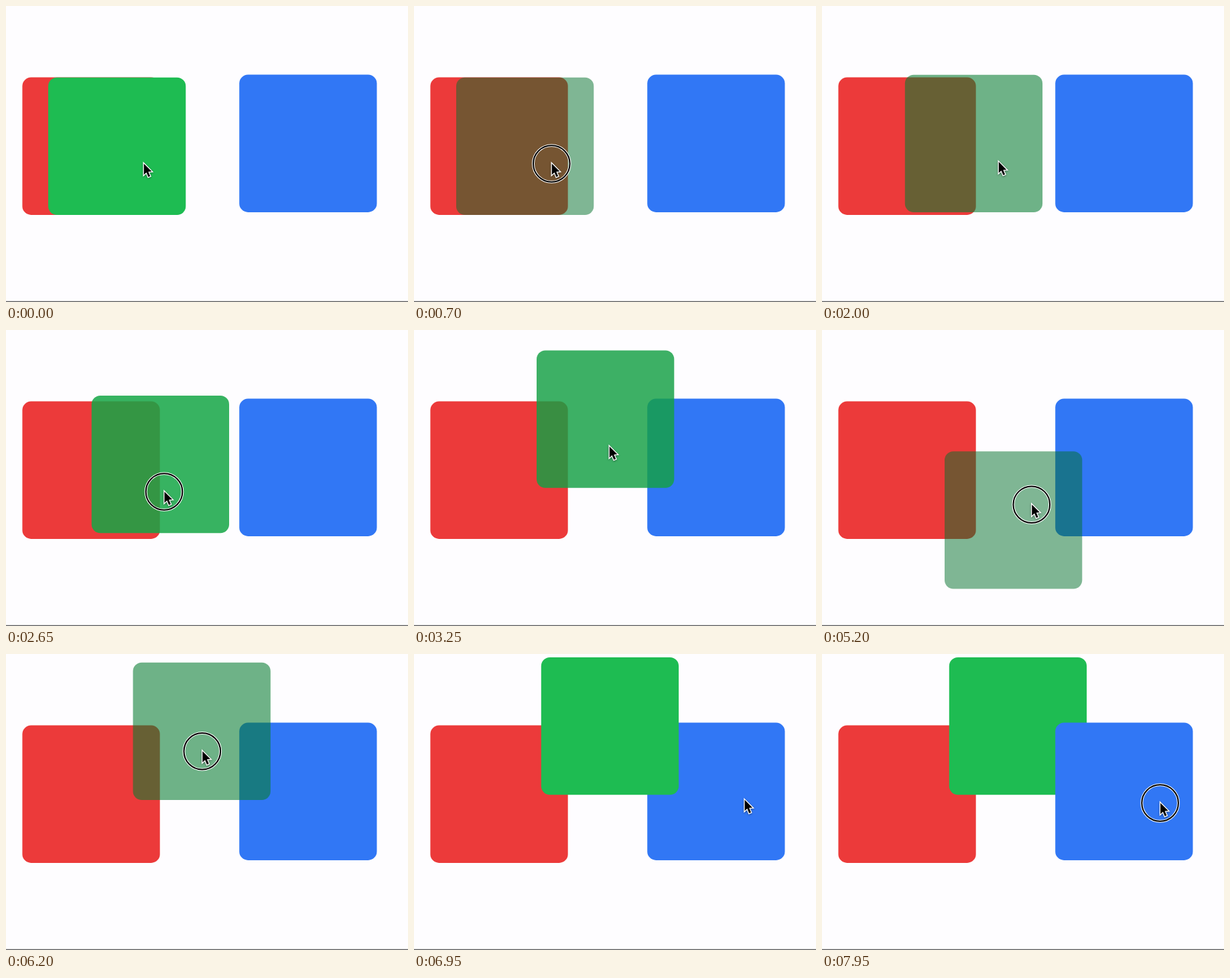
Recreate the animation shown at these times as an HTML page with a canvas. Size 600 by 442 pixels, loop 8000 ms.

```html
<!DOCTYPE html>
<html lang="en">
<head>
<meta charset="utf-8">
<title>Dragging squares</title>
<style>
html, body { margin: 0; width: 100%; height: 100%; overflow: hidden; background: #fefdff; }
canvas { display: block; }
</style>
</head>
<body>
<canvas id="stage" width="600" height="442"></canvas>
<script>
const ctx = document.getElementById('stage').getContext('2d');
const LOOP = 8000, FADE = 450, TRAVEL = 600, SIZE = 205.3;
const BLUE_PRESS = 7650, BLUE_REACH = 7050, BLUE_POINT = [504.3, 220];
const HOME = [63, 106.7];

// grip: pointer position inside the green square; to: where the square is dropped
const drags = [
  { press: 100, start: 880, end: 1700, release: 1873, grip: [142, 126.3], to: [123.8, 102.8] },
  { press: 2480, start: 2580, end: 2970, release: 2991, grip: [108, 141], to: [183, 30.5] },
  { press: 4050, start: 4235, end: 5450, release: 5450, grip: [129.5, 77], to: [183, 195] },
  { press: 5880, start: 5889, end: 6253, release: 6450, grip: [103, 130], to: [189.8, 5] }
];

const mix = (a, b, p) => a + (b - a) * p;
const mixAll = (a, b, p) => a.map((v, i) => mix(v, b[i], p));
const add = (a, b) => a.map((v, i) => v + b[i]);
const ease = p => p < 0.5 ? 2 * p * p : 1 - 2 * (1 - p) ** 2;
const ramp = (t, from, to) => ease(Math.min(1, Math.max(0, (t - from) / (to - from))));

const greenAt = t => drags.reduce((pos, d) => mixAll(pos, d.to, ramp(t, d.start, d.end)), HOME);

// The pointer holds the square by its grip and travels to the next grip before each press.
function pointerAt(t) {
  let grip = drags[0].grip, free = 0;
  for (const d of drags) {
    grip = mixAll(grip, d.grip, ramp(t, Math.max(free, d.press - TRAVEL), d.press));
    free = d.release;
  }
  return mixAll(add(greenAt(t), grip), BLUE_POINT, ramp(t, BLUE_REACH - TRAVEL, BLUE_REACH));
}

const dimAt = t => Math.max(...drags.map(({ press, release }) =>
  ramp(t, press, press + FADE) * (1 - ramp(t, release, release + FADE))));

const isPressed = t => t >= BLUE_PRESS || drags.some(d => t >= d.press && t < d.release);

function square([x, y], rgb, alpha = 1) {
  ctx.globalAlpha = alpha;
  ctx.fillStyle = `rgb(${rgb.map(Math.round)})`;
  ctx.beginPath();
  ctx.roundRect(x, y, SIZE, SIZE, 13);
  ctx.fill();
  ctx.globalAlpha = 1;
}

function ring(x, y) {
  ctx.beginPath();
  ctx.arc(x, y, 27.3, 0, 7);
  for (const [color, width] of [['#fff', 4], ['#000', 2]]) {
    ctx.strokeStyle = color;
    ctx.lineWidth = width;
    ctx.stroke();
  }
}

function arrow(x, y) {
  ctx.save();
  ctx.translate(x + 0.8, y + 2.5);
  const shape = new Path2D('M0 0V16.5L3.8 13L6.6 19.8L9.4 18.6L6.5 12L11.6 11.6Z');
  ctx.strokeStyle = '#fff';
  ctx.lineWidth = 2.6;
  ctx.shadowColor = 'rgba(0,0,0,.4)';
  ctx.shadowBlur = 3;
  ctx.shadowOffsetY = 1;
  ctx.stroke(shape);
  ctx.shadowColor = 'transparent';
  ctx.fill(shape);
  ctx.restore();
}

function draw(t) {
  ctx.fillStyle = '#fefdff';
  ctx.fillRect(0, 0, 600, 442);
  ctx.fillStyle = '#5c5c5e';
  ctx.fillRect(0, 440.7, 600, 1.3);

  const dim = dimAt(t);
  const green = () => square(greenAt(t), mixAll([30, 188, 82], [2, 113, 43], dim), 1 - dim / 2);
  const blue = () => square([348.2, 102.6], [49, 119, 245]);

  square([24.4, 106.6], [236, 58, 58]);
  if (t < BLUE_PRESS) blue();
  green();
  if (t >= BLUE_PRESS) blue();

  const [x, y] = pointerAt(t);
  if (isPressed(t)) ring(x + 0.3, y + 2.5);
  ctx.fillStyle = '#000';
  arrow(x, y);
}

const start = performance.now();
function tick() {
  draw((performance.now() - start) % LOOP);
  requestAnimationFrame(tick);
}
draw(0);
requestAnimationFrame(tick);
</script>
</body>
</html>
```
